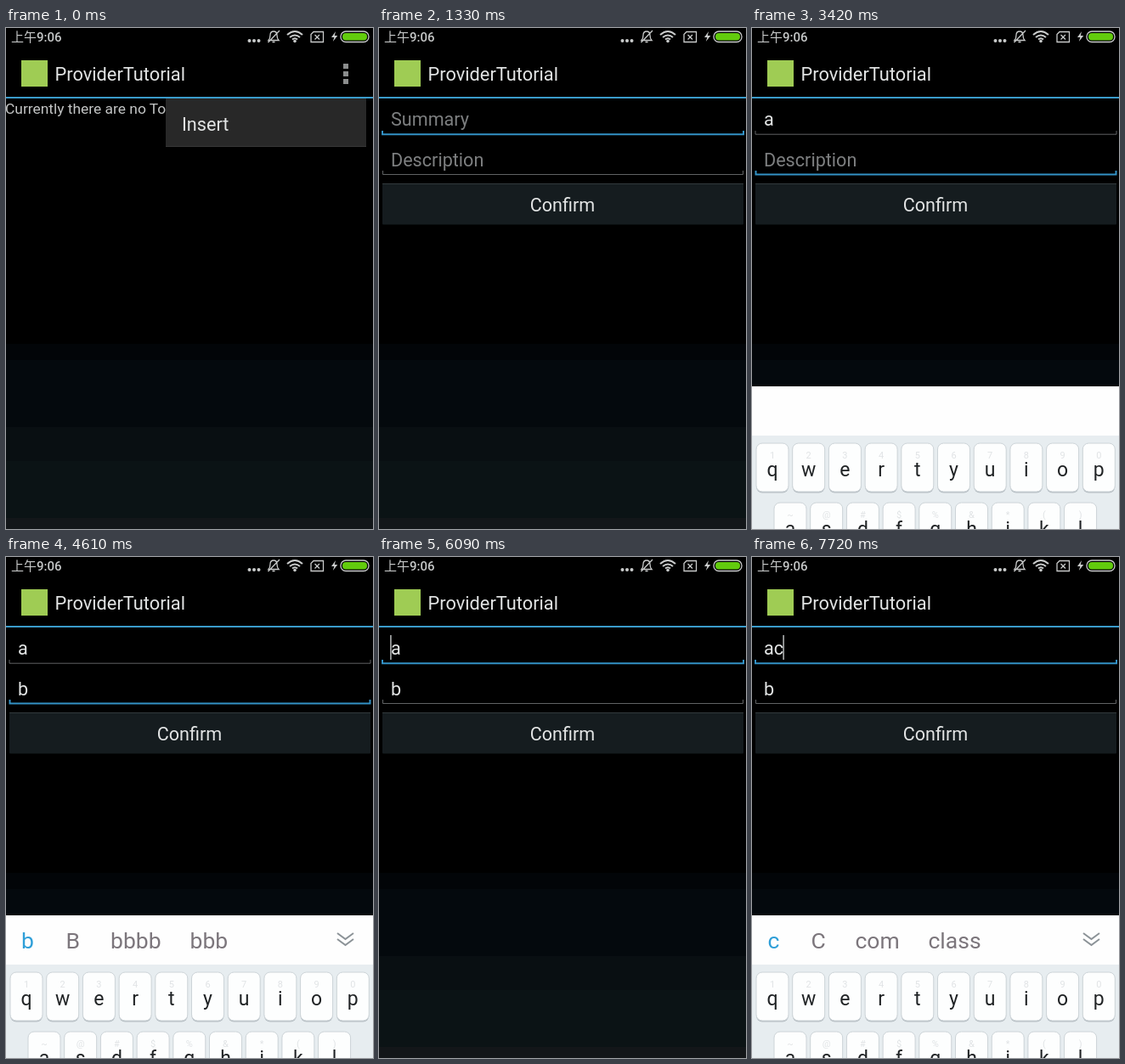
Recreate the animation shown at these times as an HTML page. Size 432 by 590 pixels, loop 8 s.

```html
<!DOCTYPE html>
<html lang="en">
<head>
<meta charset="utf-8">
<title>ProviderTutorial</title>
<style>
  html, body { margin: 0; width: 100%; height: 100%; overflow: hidden; background: #000; }
  svg { display: block; width: 432px; height: 590px; }
  text { font-family: Roboto, "Noto Sans CJK SC", "Noto Sans CJK", sans-serif; font-size: 21.6px; fill: #e2e4e4; white-space: pre; }
  .title { font-size: 21.8px; }
  .hint { fill: #7d7f80; }
  .status { font-size: 15px; font-weight: 500; fill: #c6c8c8; }
  .word { font-size: 26.5px; fill: #7c767c; }
  .word:first-child { fill: #2f9fd8; }
  .key { font-size: 23px; fill: #202325; text-anchor: middle; }
  .alt { font-size: 11px; fill: #e0e3e5; text-anchor: middle; }
  .line { fill: none; stroke: #606364; stroke-width: 1; }
  .line.focus { stroke: #3392c6; stroke-width: 2; }
</style>
</head>
<body>
<svg viewBox="0 0 432 590">
  <defs>
    <g id="backdrop">
      <rect width="432" height="590" fill="#000"/>
      <rect y="372" width="432" height="218" fill="#020508"/>
      <rect y="391" width="432" height="199" fill="#04090d"/>
      <rect y="470" width="432" height="120" fill="#090f12"/>
      <rect y="510" width="432" height="80" fill="#0b1315"/>
      <rect y="577" width="432" height="13" fill="#131619"/>
      <rect x="18" y="38" width="31" height="31" fill="#9fcc54"/>
      <text class="title" x="57.5" y="62">ProviderTutorial</text>
      <rect y="81" width="432" height="2" fill="#3a9bcb"/>
    </g>
  </defs>

  <g id="list">
    <use href="#backdrop"/>
    <path d="M397 42h6v6h-6zM397 51h6v6h-6zM397 60h6v6h-6z" fill="#8b8d8d"/>
    <text id="empty" x="-1" y="101" style="font-size:17.4px;fill:#c3c5c5">Currently there are no Todo items maintained</text>
    <g id="item">
      <rect id="itemPress" y="83" width="432" height="55" fill="#1c5f7c"/>
      <text y="121" style="font-size:29px;fill:#c3c5c5">a<tspan x="32">b</tspan></text>
    </g>
    <g id="menu">
      <rect x="188" y="83" width="236" height="57" fill="#282828"/>
      <rect id="menuPress" x="188" y="83" width="236" height="57" fill="#1c5f7c"/>
      <path d="M188 139.5h236" stroke="#383838"/>
      <text x="207" y="120.5">Insert</text>
    </g>
  </g>

  <g id="form">
    <use href="#backdrop"/>
    <text id="summary" x="14" y="115"></text>
    <path id="summaryLine" d="M4 121v4.2h425v-4.2"/>
    <text id="description" x="14" y="163"></text>
    <path id="descriptionLine" d="M4.5 168v4.5h424v-4.5"/>
    <rect id="cursor" width="1.4" height="29" fill="#c5c8c8"/>
    <rect id="confirm" x="4" y="183" width="425" height="48.5" rx="1" fill="#151c1f"/>
    <path d="M4 183.5h425" stroke="#323a3d"/>
    <text x="216" y="215.5" text-anchor="middle">Confirm</text>
  </g>

  <g id="keyboard">
    <rect y="422" width="432" height="168" fill="#e7edf0"/>
    <rect y="422" width="432" height="58" fill="#fefefe"/>
    <g id="words"></g>
    <path id="chevron" d="M390 443l9.500 7 9.500-7M390 450l9.500 7 9.500-7" fill="none" stroke="#8b9297" stroke-width="2"/>
    <g id="keys"></g>
  </g>

  <g id="statusBar">
    <rect width="432" height="22" fill="#000"/>
    <text class="status" x="6" y="15.500">上午9:06</text>
    <g fill="#c9cbcb">
      <circle cx="286.500" cy="15" r="2"/><circle cx="292" cy="15" r="2"/><circle cx="297.500" cy="15" r="2"/>
      <circle cx="340" cy="15.500" r="1.800"/>
      <path d="M388 4l-5 7h3.300l-1.500 5 5.500-7h-3.500z"/>
    </g>
    <g fill="none" stroke="#c9cbcb" stroke-width="1.300">
      <path d="M309 14.500c2-2 2-4 2-6 0-6 8-6 8 0 0 2 0 4 2 6zM313.500 16.500h3M308.500 17L322 3"/>
      <path d="M331 8q9-8 18 0M334 11q6-5 12 0M337 13.500q3-2.500 6 0" stroke-width="2"/>
      <path d="M362 4.500h11.500v12h-14.500v-9zM363.500 8l5.500 5.500M369 8l-5.500 5.500"/>
      <rect x="394" y="4" width="33" height="12.500" rx="6"/>
    </g>
    <rect x="396" y="6" width="29" height="8.500" rx="4" fill="#62cb0d"/>
  </g>
</svg>

<script>
const LOOP = 8000;
const ui = Object.fromEntries([...document.querySelectorAll('[id]')].map(node => [node.id, node]));

// Screen refreshes: first time, last time, number of steps.
const bursts = [
  [0, 0, 1], [300, 1030, 6], [1330, 1920, 5], [2220, 2220, 1], [2820, 3120, 3], [3420, 3420, 1],
  [4020, 4160, 2], [4460, 5200, 6], [5500, 6240, 6], [6540, 6980, 4], [7430, 7720, 3]
];
const roundToTen = time => Math.round(time / 10) * 10;
const ticks = bursts.flatMap(([start, end, count]) =>
  Array.from({ length: count }, (_, i) => roundToTen(start + (end - start) * i / Math.max(1, count - 1))));

const cursorOn = [[1030, 1330], [1920, 2820], [3120, 3420], [4160, 4460], [5940, 6240], [6540, LOOP]];
const suggestions = {
  a: [['a', 18.5], ['A', 70], ['as', 123], ['Android', 185], ['asd', 310]],
  b: [['b', 18], ['B', 70.5], ['bbbb', 123], ['bbb', 216.5]],
  c: [['c', 18.5], ['C', 69.5], ['com', 121.5], ['class', 207.5]]
};

const within = (t, start, end) => t >= start && t < end;
const ease = (t, start, end) => 1 - (1 - Math.min(1, Math.max(0, (t - start) / (end - start)))) ** 2;
const show = (node, visible) => node.setAttribute('visibility', visible ? 'inherit' : 'hidden');
const move = (node, x, y) => node.setAttribute('transform', `translate(${x} ${y})`);

function buildKeys() {
  const rows = [['qwertyuiop', '1234567890', 5, 489], ['asdfghjkl', '~@#$%&*()', 26, 559]];
  ui.keys.innerHTML = rows.map(([letters, alts, left, top]) => [...letters].map((letter, i) => {
    const x = left + i * 42.7, mid = x + 19;
    return `<rect x="${x}" y="${top + 1.5}" width="38" height="57" rx="7" fill="#b4bcc1"/>
      <rect x="${x}" y="${top}" width="38" height="57" rx="7" fill="#fdfefe" stroke="#cdd4d8"/>
      <text class="alt" x="${mid}" y="${top + 18}">${alts[i].replace('&', '&amp;')}</text>
      <text class="key" x="${mid}" y="${top + 39}">${letter}</text>`;
  }).join('')).join('');
}

function setField(name, value, label, focused) {
  ui[name].textContent = value || label;
  ui[name].setAttribute('class', value ? '' : 'hint');
  ui[name + 'Line'].setAttribute('class', focused ? 'line focus' : 'line');
}

function drawScreens(t) {
  const formShown = t < 4760 ? ease(t, 600, 1030)
    : t < 5500 ? 1 - ease(t, 4760, 5200) : ease(t, 5650, 5940);
  move(ui.list, -108 * formShown, 0);
  move(ui.form, 432 * (1 - formShown), 0);
  show(ui.empty, t < 4000);
  show(ui.item, t > 4000);
  show(ui.itemPress, within(t, 5500, 5650));
  show(ui.menu, t < 450);
  show(ui.menuPress, within(t, 300, 450));
}

function drawForm(t) {
  const summary = t < 2220 ? '' : t < 7580 ? 'a' : 'ac';
  const description = t < 4020 ? '' : 'b';
  const second = within(t, 2820, 5500);
  setField('summary', summary, 'Summary', !second);
  setField('description', description, 'Description', second);
  const before = within(t, 5500, 6540) ? 0 : (second ? description : summary).length;
  move(ui.cursor, 13.2 + 11.6 * before, second ? 140 : 92);
  show(ui.cursor, cursorOn.some(span => within(t, ...span)));
  ui.confirm.setAttribute('fill', within(t, 4460, 4610) ? '#1c5f7c' : '#151c1f');
}

function drawKeyboard(t) {
  const raised = t < 4610 ? ease(t, 1330, 1780)
    : t < 6000 ? 1 - ease(t, 4610, 4900) : ease(t, 6540, 6980);
  move(ui.keyboard, 0, 168 * (1 - raised));
  const typed = within(t, 2220, 2820) ? 'a' : within(t, 4020, 5200) ? 'b' : t >= 7580 ? 'c' : '';
  show(ui.chevron, typed);
  ui.words.innerHTML = (suggestions[typed] || [])
    .map(([word, x]) => `<text class="word" x="${x}" y="461">${word}</text>`).join('');
}

let lastTick = -1;
function frame() {
  const now = performance.now() % LOOP;
  const t = ticks.findLast(tick => tick <= now + 0.5);
  if (t !== lastTick) {
    lastTick = t;
    drawScreens(t);
    drawForm(t);
    drawKeyboard(t);
  }
  requestAnimationFrame(frame);
}

buildKeys();
frame();
</script>
</body>
</html>
```
